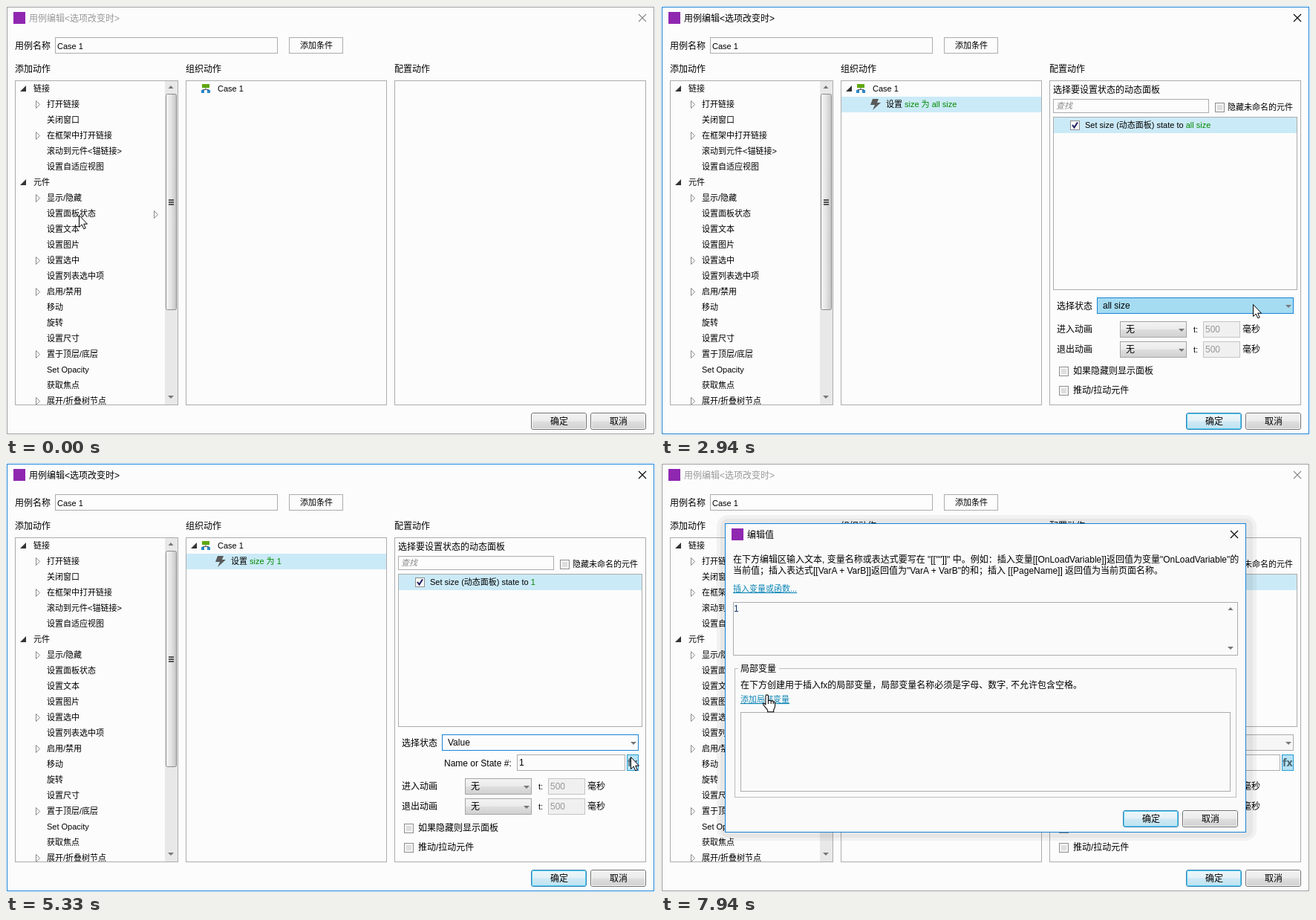
These frames come from a looping animation (874 by 577 pixels, 8000 ms). An HTML page:

```html
<!DOCTYPE html>
<html lang="zh-CN">
<head>
<meta charset="utf-8">
<title>用例编辑</title>
<style>
html, body { margin: 0; width: 100%; height: 100%; overflow: hidden; background: #fcfcfc; }
svg { display: block; width: 874px; height: 577px; }
rect, line { shape-rendering: crispEdges; }
text { font: 11px "Liberation Sans", "Noto Sans CJK SC", "Noto Sans CJK", sans-serif; fill: #000; white-space: pre; }
.b { font-size: 12px; }
.dim { fill: #6d6d6d; }
.pale { fill: #999; }
.green { fill: #008a00; }
.navy { fill: #123a6e; }
.link { fill: #0a84b5; text-decoration: underline; }
.hint { fill: #8a8a8a; font-style: italic; }
.fx { font: bold 14px "Noto Sans", sans-serif; fill: #4a6470; }
.round { shape-rendering: auto; }

/* One shared 8 s clock; every state is switched hard. */
.s { animation: 8s step-end infinite; }
.first { animation-name: first; }
.after { animation-name: after; }
.idle { animation-name: idle; }
.active { animation-name: active; }
.unset { animation-name: unset-state; }
.set { animation-name: set; }
.all { animation-name: all; }
.tall { animation-name: tall; }
.value { animation-name: value; }
.focus { animation-name: focus; }
.hover { animation-name: hover; }
.menu { animation-name: menu; }
.pick { animation-name: pick; }
.fxhover { animation-name: fxhover; }
.dialog { animation-name: dialog; }
.arrow { animation-name: arrow; }
.hand { animation-name: hand; }
.cursor { animation-name: cursor; }

@keyframes first { 0% { opacity: 1 } 5%, to { opacity: 0 } }
@keyframes after { 0% { opacity: 0 } 5%, to { opacity: 1 } }
@keyframes idle { 0% { opacity: 1 } 5% { opacity: 0 } 75%, to { opacity: 1 } }
@keyframes active { 0% { opacity: 0 } 5% { opacity: 1 } 75%, to { opacity: 0 } }
@keyframes unset-state { 0% { opacity: 0 } 5% { opacity: 1 } 27.375%, to { opacity: 0 } }
@keyframes set { 0% { opacity: 0 } 27.375%, to { opacity: 1 } }
@keyframes all { 0% { opacity: 0 } 27.375% { opacity: 1 } 56.75%, to { opacity: 0 } }
@keyframes tall { 0% { opacity: 0 } 5% { opacity: 1 } 56.75%, to { opacity: 0 } }
@keyframes value { 0% { opacity: 0 } 56.75%, to { opacity: 1 } }
@keyframes focus { 0% { opacity: 0 } 56.75% { opacity: 1 } 75%, to { opacity: 0 } }
@keyframes hover { 0% { opacity: 0 } 34.875% { opacity: 1 } 40.125%, to { opacity: 0 } }
@keyframes menu { 0% { opacity: 0 } 40.125% { opacity: 1 } 56.75%, to { opacity: 0 } }
@keyframes pick {
  0% { transform: none }
  43.125% { transform: translateY(50px) }
  44.625% { transform: translateY(100px) }
  46.125%, to { transform: translateY(125px) }
}
@keyframes fxhover { 0% { opacity: 0 } 65%, to { opacity: 1 } }
@keyframes dialog { 0% { opacity: 0 } 75%, to { opacity: 1 } }
@keyframes arrow { 0% { opacity: 1 } 95.625%, to { opacity: 0 } }
@keyframes hand { 0% { opacity: 0 } 95.625%, to { opacity: 1 } }
@keyframes cursor {
  0% { transform: translate(98px, 281px) }
  8.5% { transform: translate(158px, 249px) }
  10.125% { transform: translate(245px, 193px) }
  11.75% { transform: translate(370px, 160px) }
  13.375% { transform: translate(476px, 143px) }
  15.25% { transform: translate(540px, 154px) }
  17.25% { transform: translate(558px, 159px) }
  31.125% { transform: translate(600px, 210px) }
  33% { transform: translate(690px, 310px) }
  34.875% { transform: translate(765px, 392px) }
  36.75% { transform: translate(797px, 401px) }
  41.625% { transform: translate(770px, 425px) }
  43.125% { transform: translate(700px, 485px) }
  44.625% { transform: translate(641px, 533px) }
  46.125% { transform: translate(630px, 546px) }
  47.625% { transform: translate(628px, 549px) }
  58.375% { transform: translate(640px, 540px) }
  60% { transform: translate(690px, 500px) }
  61.625% { transform: translate(760px, 445px) }
  63.25% { transform: translate(815px, 410px) }
  65% { transform: translate(838px, 397px) }
  66.625% { transform: translate(841px, 395px) }
  82.625% { transform: translate(800px, 395px) }
  84.5% { transform: translate(680px, 385px) }
  86.375% { transform: translate(540px, 370px) }
  88.375% { transform: translate(420px, 352px) }
  90.1875% { transform: translate(310px, 335px) }
  92% { transform: translate(230px, 325px) }
  93.8125% { transform: translate(170px, 318px) }
  95.625% { transform: translate(145px, 314px) }
  97.4375% { transform: translate(136px, 308px) }
  99.25%, to { transform: translate(138px, 313px) }
}
</style>
</head>
<body>
<svg id="stage" viewBox="0 0 874 577">
  <defs>
    <linearGradient id="steel" x2="0" y2="1">
      <stop stop-color="#f3f3f3"/><stop offset=".48" stop-color="#ebebeb"/>
      <stop offset=".52" stop-color="#dedede"/><stop offset="1" stop-color="#d0d0d0"/>
    </linearGradient>
    <linearGradient id="glow" x2="0" y2="1">
      <stop stop-color="#eef6f9"/><stop offset=".48" stop-color="#e2f1f7"/>
      <stop offset=".52" stop-color="#cfe9f4"/><stop offset="1" stop-color="#bde2f1"/>
    </linearGradient>
    <linearGradient id="thumb">
      <stop stop-color="#f6f6f6"/><stop offset=".5" stop-color="#e3e3e3"/><stop offset="1" stop-color="#c6c6c6"/>
    </linearGradient>
    <clipPath id="tree"><rect x="13" y="101" width="201" height="435"/></clipPath>
  </defs>
</svg>
<script>
const BLUE = '#1883d7', ROW = '#cbeaf7', PAPER = '#fcfcfc', PANE = '#fafafa', EDGE = '#acacac', PURPLE = '#8f27b0';

const text = (x, y, str, cls = '') => `<text x="${x}" y="${y + 4}" class="${cls}">${str}</text>`;
const big = (x, y, str, cls = '') => text(x, y, str, 'b ' + cls);
const green = str => `<tspan class="green">${str}</tspan>`;
const fill = (x, y, r, b, color, extra = '') =>
  `<rect x="${x}" y="${y}" width="${r - x}" height="${b - y}" fill="${color}" ${extra}/>`;
// Bordered box; the edges are given as its outer pixels.
const box = (x, y, r, b, color = PAPER, edge = EDGE, extra = '') =>
  `<rect x="${x + .5}" y="${y + .5}" width="${r - x - 1}" height="${b - y - 1}" fill="${color}" stroke="${edge}" ${extra}/>`;
const path = (d, color, extra = '') => `<path d="${d}" fill="${color}" ${extra}/>`;
const on = (state, ...parts) => `<g class="s ${state}">${parts.join('')}</g>`;
const round = radius => `rx="${radius}" class="round"`;

const button = (x, y, label, lit) =>
  box(x, y, x + 75, y + 23, lit ? 'url(#glow)' : 'url(#steel)', lit ? '#3c7fb1' : '#707070', round(2.5)) +
  box(x + 1, y + 1, x + 74, y + 22, 'none', lit ? '#46d0f5' : '#fafafa', round(1.5)) +
  big(x + 26, y + 12, label);
const check = (x, y, ticked, edge = '#8e8f8f') =>
  box(x, y, x + 13, y + 13, '#f4f4f4', edge) + fill(x + 3, y + 3, x + 10, y + 10, '#dedede') +
  (ticked ? fill(x + 1, y + 1, x + 12, y + 12, '#f7f7f7') +
    path(`M${x + 3} ${y + 6}l2.5 3.5 4.5-7`, 'none', 'stroke="#1c1c5c" stroke-width="2"') : '');
const down = (x, y, color = '#777') => path(`M${x - 4} ${y - 2}h8l-4 4z`, color);
const up = (x, y) => path(`M${x - 3.5} ${y + 2}h7l-3.5-4z`, '#777');
const combo = (x, y, r, label, color, edge) =>
  box(x, y, r, y + 22, color, edge) + down(r - 7, y + 12) + big(x + 8, y + 11, label);
const cross = (x, y, color) => path(`M${x} ${y}l10 10m0-10l-10 10`, 'none', `stroke="${color}" stroke-width="1.1"`);
const opened = (x, y) => path(`M${x} ${y + 4}h8v-8z`, '#333');
const closed = (x, y) => path(`M${x + .5} ${y - 4.5}v10l5-5z`, 'none', 'stroke="#8a8a8a"');

function frame() {
  const title = '用例编辑&lt;选项改变时&gt;';
  return fill(0, 0, 874, 577, PAPER) +
    on('idle', box(1, 1, 873, 576, 'none', '#9a9a9a'), big(31, 17, title, 'pale'), cross(852, 11, '#888')) +
    on('active', box(1, 1, 873, 576, 'none', BLUE), big(31, 17, title), cross(852, 11, '#000')) +
    fill(10, 8, 26, 24, PURPLE) +
    big(12, 54, '用例名称') + box(66, 42, 366, 64) + text(69, 54, 'Case 1') +
    box(381, 42, 454, 64) + text(396, 53, '添加条件') +
    big(12, 85, '添加动作') + big(242, 85, '组织动作') + big(523, 85, '配置动作') +
    box(12, 100, 232, 537) + box(242, 100, 513, 537) + box(523, 100, 862, 537) +
    on('first', button(707, 547, '确定')) + on('after', button(707, 547, '确定', true)) +
    button(787, 547, '取消');
}

// "-" marks a group, "+" an item that can be unfolded.
function tree() {
  const rows = ['-链接', '+打开链接', '关闭窗口', '+在框架中打开链接', '滚动到元件&lt;锚链接&gt;', '设置自适应视图',
    '-元件', '+显示/隐藏', '设置面板状态', '设置文本', '设置图片', '+设置选中', '设置列表选中项', '+启用/禁用',
    '移动', '旋转', '设置尺寸', '+置于顶层/底层', 'Set Opacity', '获取焦点', '+展开/折叠树节点'];
  const items = rows.map((row, i) => {
    const y = 111 + 21 * i, name = row.replace(/^[-+]/, '');
    if (row[0] === '-') return opened(19, y) + text(37, y, name);
    return (row[0] === '+' ? closed(40, y) : '') + text(55, y, name);
  });
  return `<g clip-path="url(#tree)">${items.join('')}</g>` +
    on('first', closed(199, 280)) +
    fill(214, 101, 231, 536, '#e8e8e8') + up(222, 109) + down(222, 526) +
    box(215, 118, 230, 409, 'url(#thumb)', '#8c8c8c', round(2)) +
    [260, 263, 266].map(y => fill(219, y, 226, y + 1.5, '#555')).join('');
}

function cases() {
  const icon = fill(264, 105, 274, 110, '#5fa80f') +
    path('M269 110v2.5M265 115v-2.5h8v2.5', 'none', 'stroke="#555"') +
    fill(263, 113, 267, 117, '#2a87c8') + fill(271, 113, 275, 117, '#2a87c8');
  return icon + text(285, 111, 'Case 1') +
    on('after', opened(249, 111), fill(243, 122, 512, 143, ROW),
      path('M285 125h8l-2 5h5l-11 10 3-7h-6z', '#5a5a5a'), text(303, 132, '设置')) +
    on('unset', text(328, 132, '动态面板状态', 'green')) +
    on('all', text(328, 132, 'size 为 all size', 'green')) +
    on('value', text(328, 132, 'size 为 1', 'green'));
}

function options(set) {
  const cls = set ? '' : 'dim', tint = set ? 'url(#steel)' : '#f2f2f2', edge = set ? '#a5a5a5' : '#cfcfcf';
  const timing = (y, label) => big(533, y, label, cls) +
    combo(618, y - 11, 708, set ? '无' : '', tint, edge) + text(717, y, 't:', cls) +
    box(730, y - 11, 780, y + 11, '#f0f0f0', '#c4c4c4') + big(733, y, set ? '500' : '', 'pale') +
    big(783, y, '毫秒', cls);
  const flag = (y, label) => check(536, y - 6, false, set ? '#8e8f8f' : '#c0c0c0') + big(555, y, label, cls);
  return timing(435, '进入动画') + timing(462, '退出动画') +
    flag(491, '如果隐藏则显示面板') + flag(517, '推动/拉动元件');
}

function config() {
  const setRow = target => text(571, 160, 'Set size (动态面板) state to ' + green(target));
  return on('after', big(528, 113, '选择要设置状态的动态面板'), box(528, 125, 738, 144),
      text(532, 134, '查找', 'hint'), check(746, 130), text(763, 136, '隐藏未命名的元件')) +
    on('tall', box(528, 149, 857, 382)) +
    on('unset', check(551, 154), text(571, 160, 'size (动态面板)'), big(533, 404, '选择状态', 'dim'),
      combo(587, 392, 852, '', '#f2f2f2', '#cfcfcf'), options(false)) +
    on('value', box(528, 149, 857, 355)) +
    on('set', fill(529, 150, 856, 171, ROW), check(551, 154, true), options(true)) +
    on('all', setRow('all size'), big(533, 404, '选择状态'),
      combo(587, 392, 852, 'all size', 'url(#steel)', '#a5a5a5')) +
    on('hover', combo(587, 392, 852, 'all size', '#a5dcf2', BLUE)) +
    on('value', setRow('1'), big(533, 377, '选择状态'), combo(587, 365, 852, 'Value', '#f6f6f6', EDGE),
      big(590, 404, 'Name or State #:'), box(688, 392, 834, 414), big(691, 403, '1'),
      box(836, 392, 852, 414),
      on('fxhover', box(836, 392, 852, 414, '#b5e3f5', '#2a9bd0')),
      text(837, 404, 'fx', 'fx')) +
    on('focus', combo(587, 365, 852, 'Value', PAPER, BLUE));
}

function menu() {
  const items = ['all size', 'only L', 'Next', 'Previous', '停止循环', 'Value'];
  return on('menu', combo(587, 392, 852, 'all size', PAPER, BLUE),
    fill(590, 417, 856, 568, 'rgba(0,0,0,.22)'), box(587, 414, 854, 566, PAPER, '#646464'),
    on('pick', fill(588, 415, 853, 440, ROW)),
    ...items.map((item, i) => big(598, 428 + 25 * i, item)));
}

function dialog() {
  return on('dialog',
    fill(75, 70, 802, 508, 'rgba(0,0,0,.045)', round(15)),
    fill(80, 75, 797, 504, 'rgba(0,0,0,.045)', round(10)),
    box(86, 81, 788, 497, PANE, BLUE),
    fill(95, 88, 111, 104, PURPLE), big(116, 97, '编辑值'), cross(767, 91, '#000'),
    big(97, 130, '在下方编辑区输入文本, 变量名称或表达式要写在 "[[""]]" 中。例如：插入变量[[OnLoadVariable]]返回值为变量"OnLoadVariable"的'),
    big(97, 145, '当前值；插入表达式[[VarA + VarB]]返回值为"VarA + VarB"的和；插入 [[PageName]] 返回值为当前页面名称。'),
    text(97, 169, '插入变量或函数...', 'link'),
    box(97, 187, 777, 259, PANE), big(98, 196, '1', 'navy'), up(767, 196), down(767, 249),
    box(99, 276, 775, 450, 'none', '#bdbdbd'), fill(104, 275, 159, 279, PANE), big(107, 277, '局部变量'),
    big(107, 299, '在下方创建用于插入fx的局部变量，局部变量名称必须是字母、数字, 不允许包含空格。'),
    text(107, 318, '添加局部变量', 'link'),
    box(107, 335, 767, 442, PANE),
    button(622, 467, '确定', true), button(702, 467, '取消'));
}

function cursor() {
  const ink = 'stroke="#000" stroke-linejoin="round"';
  return on('cursor',
    on('arrow', path('M.5 .5v16l3.7-3.4 2.6 5.7 2.4-1-2.5-5.6h4.8z', '#fff', ink)),
    on('hand', '<g transform="translate(-2 -2) scale(1.08)">' +
      path('M4.5 13V2.5a1.7 1.7 0 0 1 3.4 0V8l1.8-.6 1.6 1 1.8-.4 1.3 1.2 1.3.2c.8 1 .6 4.5.4 6.5l-1.6 3.6V22H7v-2.2L2 13.5c-1.4-2 .5-3.4 2.5-.5z', '#fff', ink) +
      path('M7.9 8v4M11.3 8.4V12M14.2 9.2V12', 'none', ink) + '</g>'));
}

document.getElementById('stage').insertAdjacentHTML('beforeend',
  frame() + tree() + cases() + config() + menu() + dialog() + cursor());
</script>
</body>
</html>
```
